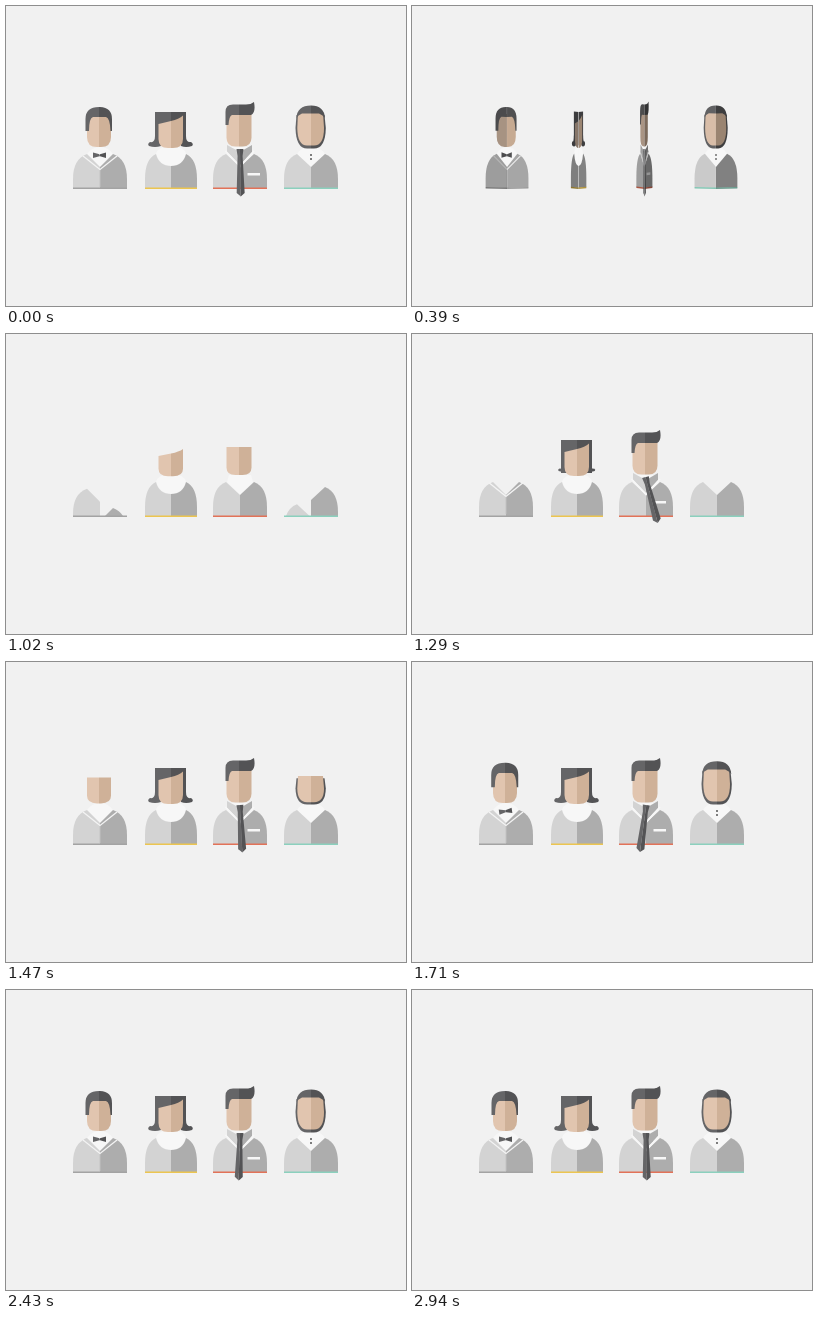
Animation of 400x300 px, one loop 2.97 s. Source, as an HTML page:

```html
<!DOCTYPE html>
<html lang="en">
<head>
<meta charset="utf-8">
<title>Four busts</title>
<style>
  html, body { margin: 0; width: 100%; height: 100%; overflow: hidden; background: #f1f1f1; }
  #stage { position: relative; width: 400px; height: 300px; overflow: hidden; }
  svg { position: absolute; left: 0; top: 0; width: 400px; height: 300px; }
</style>
</head>
<body>
<div id="stage"></div>
<script>
const LOOP = 2970, SPIN_END = 565;
const LIGHT = '#d3d3d3', DARK = '#adadad', HAIR = '#656567', HAIR_R = '#535355';
const SKIN = '#e1c5af', SKIN_R = '#cfb198', WHITE = '#f7f7f7';

const path = (d, fill, extra = '') => `<path d="${d}" fill="${fill}" ${extra}/>`;
const part = (name, body) => `<g data-part="${name}">${body}</g>`;
const stroke = (d, color, width) => path(d, 'none', `stroke="${color}" stroke-width="${width}"`);

// One side of the bust; s is -1 for left, 1 for right.
function half(cx, hw, s, peak, neck) {
  const side = cx + s * hw, top = cx + s * peak;
  const d = `M${cx} 182H${side}V173Q${side} 153 ${top} 148${neck(cx, s)}Z`;
  return part(s < 0 ? 'left' : 'right', path(d, s < 0 ? LIGHT : DARK));
}
const vNeck = cx => `L${cx} 161`;
const roundNeck = (cx, s) => `Q${cx + s * 12} 160 ${cx} 160`;

function bust(cx, hw, peak, neck, color) {
  return `<g clip-path="url(#base)">${half(cx, hw, -1, peak, neck)}${half(cx, hw, 1, peak, neck)}</g>` +
    part('line', `<rect x="${cx - hw}" y="181.5" width="${2 * hw}" height="1.5" fill="${color}"/>`);
}

function face(cx, hw, top, bottom, r) {
  const side = s => `M${cx} ${top}H${cx + s * hw}V${bottom - r}q0 ${r} ${-s * r} ${r}H${cx}Z`;
  return path(side(-1), SKIN) + path(side(1), SKIN_R);
}

const figures = [
  {
    cx: 94, dir: -1, delay: 110, start: 830, first: 'left', hw: 27,
    shirt: path('M81 148Q86 141 94 141T107 148L94 161Z', WHITE),
    art: bust(94, 27, 13, vNeck, '#a3a3a3') +
      part('lapel', stroke('M77 150L94 163.5L111 150', '#f4f4f4', 1.3) +
        stroke('M94 164V181', '#c2c2c2', 1)) +
      part('face', face(93, 12, 108, 141, 10)) +
      part('hair', path('M79.5 125V113Q79.5 101 93 101V111H87Q83 112 83 125Z', HAIR) +
        path('M93 101Q106 101 106 113V125H104.5Q104 112 100 111H93Z', HAIR_R)) +
      part('bow', path('M87 146.5L93.5 148.3V150.2L87 152Z', HAIR) +
        path('M100 146.5L93.5 148.3V150.2L100 152Z', HAIR_R))
  },
  {
    cx: 165, dir: -1, delay: 0, start: 565, first: 'left', hw: 26,
    shirt: path('M150 148Q152 140 165 140T180 148Q176 160 165 160T150 148Z', WHITE),
    art: bust(165, 26, 15, roundNeck, '#ecc550') +
      part('hair', path('M149 106H165V139H149Z', HAIR) + path('M165 106H180V139H165Z', HAIR_R)) +
      part('flipL', path('M149 130Q149 137 144 136Q141 138 143 140Q149 142 155 140V130Z', HAIR)) +
      part('flipR', path('M180 130Q180 137 185 136Q188 138 186 140Q180 142 175 140V130Z', HAIR_R)) +
      part('face', path('M152.5 118L165 115V142H162Q152.5 142 152.5 133Z', SKIN) +
        path('M165 115Q173 113 177 109.5V133Q177 142 167 142H165Z', SKIN_R))
  },
  {
    cx: 234, dir: 1, delay: 0, start: 565, first: 'right', hw: 27,
    shirt: path('M221 148L223 141H245L247 148L234 161Z', WHITE),
    art: bust(234, 27, 14, vNeck, '#e27258') +
      part('collar', path('M221 139V146L234 159V146Z', LIGHT) +
        path('M246 139V146L234 159V146Z', DARK) +
        stroke('M219.5 145L234 160.5L248 145', WHITE, 1.6) +
        path('M241.5 167H254V169.5H241.5Z', WHITE)) +
      part('face', face(233, 12.5, 107, 140.5, 9)) +
      part('tie', path('M230.5 143H234V190.5L230 187L231.5 150Z', HAIR) +
        path('M234 143H237.5L236.5 150L238 187L234 190.5Z', HAIR_R)) +
      part('hair', path('M219.5 119V106Q219.5 98.5 227 98.5H233V109H226Q223 110 222.5 119Z', HAIR) +
        path('M233 98.5H240Q245 98.5 248 96Q250 107 245 109H233Z', HAIR_R))
  },
  {
    cx: 305, dir: 1, delay: 110, start: 830, first: 'right', hw: 27,
    shirt: path('M291 148Q297 140 305 140T319 148L305 161Z', WHITE),
    art: bust(305, 27, 14, vNeck, '#8bd0bd') +
      part('face',
        path('M305 109H290.5L289.5 122Q290 142.5 301 142.5H305Z', HAIR) +
        path('M305 109H318.5L319.8 122Q319.5 142.5 308 142.5H305Z', HAIR_R) +
        path('M305 106H292L291.3 122Q291.5 139.5 301 139.5H305Z', SKIN) +
        path('M305 106H317L318 122Q318 139.5 308 139.5H305Z', SKIN_R)) +
      part('hair', path('M290.5 112Q291 99.5 305 99.5V107.5H296Q292 109 290.5 112Z', HAIR) +
        path('M305 99.5Q318 99.5 319 112Q317 109 313 107.5H305Z', HAIR_R)) +
      part('dots', '<circle cx="305" cy="149" r="1" fill="#555"/><circle cx="305" cy="153" r="1" fill="#555"/>')
  }
];

// Every figure is drawn as two clipped sides, so it can fold like a card.
function side(f, s) {
  const svg = document.createElementNS('http://www.w3.org/2000/svg', 'svg');
  svg.setAttribute('viewBox', '0 0 400 300');
  svg.innerHTML = '<clipPath id="base"><rect width="400" height="182"/></clipPath>' +
    part('shirt', f.shirt) + `<g class="shaded">${f.art}</g>`;
  svg.style.transformOrigin = `${f.cx}px 160px`;
  svg.style.clipPath = s < 0 ? `inset(0 ${400 - f.cx}px 0 0)` : `inset(0 0 0 ${f.cx}px)`;
  document.getElementById('stage').append(svg);
  svg.querySelectorAll('[data-part]').forEach(g => (f.parts[g.dataset.part] ??= []).push(g));
  return { s, svg, shaded: svg.querySelector('.shaded') };
}
for (const f of figures) {
  f.parts = {};
  f.sides = [side(f, -1), side(f, 1)];
}

const span = (t, from, len) => Math.min(1, Math.max(0, (t - from) / len));
const out = p => 1 - (1 - p) ** 2;
const back = p => p <= 0 ? 0 : 1 + 2.9 * (p - 1) ** 3 + 1.9 * (p - 1) ** 2;
const swing = (t, t0, amp, period, decay) =>
  amp * Math.exp(-Math.max(0, t - t0) * decay) * Math.cos(2 * Math.PI * (t - t0) / period);

const put = (gs, value, name = 'transform') => gs.forEach(g => g.setAttribute(name, value));
const scale = (gs, x, y, sx, sy, angle = 0) =>
  put(gs, `translate(${x} ${y}) rotate(${angle}) scale(${sx} ${sy}) translate(${-x} ${-y})`);

function build(f, t) {
  const { parts: p, cx, start, first } = f;
  const early = start < 800;
  const fromLeft = first === 'left';
  scale(p.line, cx + (fromLeft ? -f.hw : f.hw), 182, span(t, start, 133), 1);

  const lead = start + (fromLeft ? 55 : 40);
  const rise = from => `translate(0 ${36 * (1 - out(span(t, from, 240)))})`;
  put(p.left, rise(fromLeft ? lead : lead + 100));
  put(p.right, rise(fromLeft ? lead + 100 : lead));

  const head = early ? 920 : 1380;
  scale(p.shirt, cx, 161, 1, out(span(t, head - 40, 120)));
  scale(p.face, cx, 143, 1, out(span(t, head, 170)));

  if (p.flipL) {
    scale(p.hair, cx, 106, 1, out(span(t, 1100, 130)));
    const flip = out(span(t, 1215, 190));
    scale(p.flipL, 153, 132, flip, flip);
    scale(p.flipR, 177, 132, flip, flip);
  } else {
    const h = back(span(t, head + 180, 170));
    scale(p.hair, cx, 110, h, h);
  }

  if (p.lapel) {
    const l = span(t, 1190, 180);
    put(p.lapel, `translate(0 ${-6 * (1 - out(l))})`);
    put(p.lapel, Math.min(1, l * 3), 'opacity');
  }
  if (p.bow) {
    const b = back(span(t, 1550, 130));
    scale(p.bow, 93.5, 149, b, b, swing(t, 1690, -10, 300, .007));
  }
  if (p.dots) {
    const d = back(span(t, 1570, 120));
    scale(p.dots, 305, 151, d, d);
  }
  if (p.tie) {
    const c = out(span(t, 1040, 120));
    scale(p.collar, 234, 156, c, c);
    const drop = out(span(t, 1130, 120));
    scale(p.tie, 234, 145, drop, drop, swing(t, 1300, -15, 820, .00165));
  }
}

function fold(f, angle) {
  const turn = angle * Math.PI / 180, sin = Math.sin(turn);
  for (const { s, svg, shaded } of f.sides) {
    const bright = s === f.dir ? 1 - .42 * sin : 1 - .3 * sin ** 4;
    svg.style.visibility = angle >= 89.5 ? 'hidden' : 'visible';
    svg.style.transform = angle
      ? `translateX(${-1.7 * f.dir * sin}px) scaleX(${Math.cos(turn)}) skewY(${-2 * s * sin}deg)` : 'none';
    shaded.style.filter = angle ? `brightness(${bright})` : 'none';
  }
}

function draw(t) {
  const spinning = t < SPIN_END;
  for (const f of figures) {
    fold(f, spinning ? 90 * span(t, f.delay, 435) ** 2 : 0);
    build(f, spinning ? LOOP : t);
  }
}

const began = performance.now();
function tick() {
  draw((performance.now() - began) % LOOP);
  requestAnimationFrame(tick);
}
draw(0);
requestAnimationFrame(tick);
</script>
</body>
</html>
```
